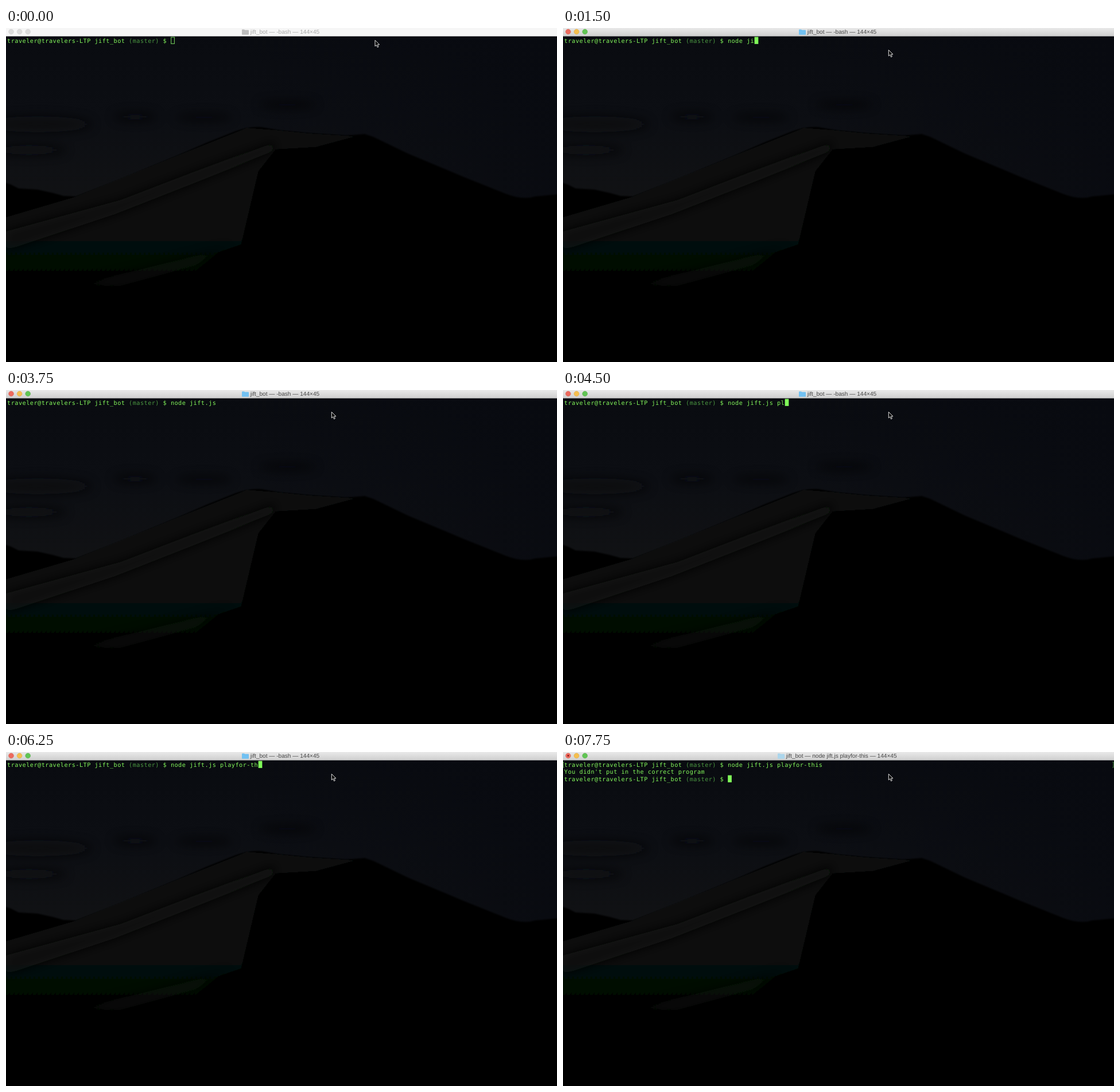
An HTML page for the animation above (8 s loop, 960 by 583 pixels).

```html
<!DOCTYPE html>
<html lang="en">
<head>
<meta charset="utf-8">
<title>Terminal session</title>
<style>
  html, body { margin: 0; width: 100%; height: 100%; overflow: hidden; background: #040506; }
  svg { display: block; width: 100vw; height: 100vh; }
  text { white-space: pre; text-rendering: geometricPrecision; }
  .term text { font: 10.2px "DejaVu Sans Mono", monospace; letter-spacing: .489px; fill: #83f75b; }
  .term .branch { fill: #4c9a42; }
  .term .mark { fill: none; stroke: #4f9446; stroke-width: 1; }
  #title { font: 10.1px "Liberation Sans", Arial, sans-serif; fill: #474747; }
  #folder { fill: #72c1f2; }
  .light { stroke-width: .5; }
  .r { fill: #ed6a5e; stroke: #d5564a; }
  .y { fill: #f5bf4f; stroke: #d8a23c; }
  .g { fill: #61c554; stroke: #4ea73f; }
  .idle #bar { fill: #f6f6f6; }
  .idle #title { fill: #a8a8a8; }
  .idle #folder { fill: #bcbcbc; }
  .idle .light { fill: #dcdcdc; stroke: #cacaca; }
  .busy #folder { fill: #acd6ec; }
  #dot { fill: #7c150f; visibility: hidden; }
  .busy #dot { visibility: visible; }
</style>
</head>
<body>
<svg id="stage" viewBox="0 0 960 583" preserveAspectRatio="none">
  <defs>
    <linearGradient id="sky" x1="0" y1="0" x2="0" y2="1">
      <stop offset="0" stop-color="#090b10"/>
      <stop offset=".5" stop-color="#0c0e13"/>
      <stop offset="1" stop-color="#111214"/>
    </linearGradient>
    <linearGradient id="east" x1="0" y1="0" x2="1" y2="0">
      <stop offset=".4" stop-color="#080a10" stop-opacity="0"/>
      <stop offset="1" stop-color="#080a10" stop-opacity=".9"/>
    </linearGradient>
    <linearGradient id="slope" x1="0" y1="180" x2="0" y2="510" gradientUnits="userSpaceOnUse">
      <stop offset="0" stop-color="#080909"/>
      <stop offset=".55" stop-color="#070807"/>
      <stop offset="1" stop-color="#040506"/>
    </linearGradient>
    <linearGradient id="metal" x1="0" y1="0" x2="0" y2="1">
      <stop offset="0" stop-color="#e9e9e9"/>
      <stop offset="1" stop-color="#cecece"/>
    </linearGradient>
    <filter id="soft" x="-30%" y="-80%" width="160%" height="260%"><feGaussianBlur stdDeviation="9"/></filter>
    <filter id="edge"><feGaussianBlur stdDeviation="1.2"/></filter>
    <clipPath id="hill"><path d="M0 330 L122 294 L300 222 L420 174 L470 178 L630 186 L470 583 H0Z"/></clipPath>
  </defs>

  <rect width="960" height="310" fill="url(#sky)"/>
  <rect width="960" height="310" fill="url(#east)"/>
  <g fill="#07080b" opacity=".65" filter="url(#soft)">
    <ellipse cx="55" cy="168" rx="95" ry="14"/>
    <ellipse cx="225" cy="155" rx="38" ry="7"/>
    <ellipse cx="345" cy="156" rx="50" ry="6"/>
    <ellipse cx="40" cy="213" rx="65" ry="9"/>
    <ellipse cx="490" cy="134" rx="50" ry="6"/>
  </g>
  <path filter="url(#edge)" fill="#040506" d="M-5 269 L8 273 L22 280 L55 282 L82 288 L100 293 L122 294 L200 264 L300 222 L350 200 L400 180 Q425 171 445 173 L480 179 L530 184 L590 188 L625 185 L640 190 L700 219 L800 261 L870 289 Q900 301 922 294 L965 290 V590 H-5Z"/>
  <g clip-path="url(#hill)">
    <path filter="url(#edge)" fill="url(#slope)" d="M0 330 L122 294 L300 222 L420 174 L470 178 L530 184 L610 189 L540 208 L470 212 L440 250 L410 378 L370 392 L330 425 L290 460 L210 490 L150 500 L0 490Z"/>
    <path filter="url(#soft)" fill="#0a0e0a" d="M0 355 L200 300 L330 250 L470 198 L465 216 L330 270 L190 325 L0 388Z"/>
    <path filter="url(#soft)" fill="#080b08" opacity=".7" d="M90 455 L240 420 L390 382 L330 415 L200 450Z"/>
  </g>

  <rect id="bar" width="960" height="14.5" fill="url(#metal)"/>
  <circle class="light r" cx="9" cy="6.5" r="4.4"/>
  <circle class="light y" cx="23.6" cy="6.5" r="4.4"/>
  <circle class="light g" cx="38.2" cy="6.5" r="4.4"/>
  <circle id="dot" cx="9" cy="6.5" r="1.4"/>
  <path id="folder" d="M0 3.2 Q0 2.4 .8 2.4 H4 L5.2 3.6 H11.2 Q12 3.6 12 4.4 V11 Q12 11.8 11.2 11.8 H.8 Q0 11.8 0 11Z"/>
  <text id="title" y="10.3"></text>

  <g class="term">
    <g id="marks" class="mark">
      <path d="M2 17.5 H.5 V27 H2"/>
      <path d="M957.5 17.5 H959 V27 H957.5"/>
    </g>
    <text id="line0" x="2.1" y="25.6"></text>
    <text id="line1" x="2.1" y="38.1"></text>
    <text id="line2" x="2.1" y="50.6"></text>
    <rect id="caret" width="6.7" height="12.3"/>
  </g>

  <path id="mouse" d="M0 0 V10.6 L2.5 8.4 L4.2 12.4 L6 11.6 L4.3 7.7 H7.6Z" fill="#060606" stroke="#e4e4e4" stroke-width="1" stroke-linejoin="round"/>
</svg>
<script>
  const LOOP = 8000, PITCH = 6.63, ROW = 12.5, LEFT = 2.1;
  const GREEN = '#80fa59';
  const APP = 'jift_bot', COMMAND = 'node jift.js playfor-this';
  const HEAD = 'traveler@travelers-LTP ' + APP + ' ', BRANCH = '(master)', TAIL = ' $ ';
  const PROMPT = (HEAD + BRANCH + TAIL).length;
  const REPLY = "You didn't put in the correct program";

  // [time in ms, characters typed so far]
  const TYPED = [
    [0, 0], [750, 2], [1000, 4], [1250, 5], [1500, 7], [1750, 9], [2000, 10],
    [2750, 11], [3000, 12], [3250, 13],
    [4250, 14], [4500, 15], [4750, 16], [5000, 17], [5250, 18],
    [5500, 19], [5750, 21], [6000, 22], [6250, 23], [6500, 25]
  ];
  const ACTIVE = 250, BLINK = [3750, 4250], ENTER = 6750, RUN = 7000, ANSWER = 7500, DONE = 7750;

  const $ = id => document.getElementById(id);
  const place = (el, x, y) => el.setAttribute('transform', `translate(${x} ${y})`);
  const show = (el, on) => el.setAttribute('visibility', on ? 'visible' : 'hidden');

  function addPrompt(line) {
    for (const part of [HEAD, BRANCH, TAIL, '']) {
      const span = document.createElementNS('http://www.w3.org/2000/svg', 'tspan');
      span.textContent = part;
      if (part === BRANCH) span.setAttribute('class', 'branch');
      line.append(span);
    }
    return line.lastChild;
  }

  const input = addPrompt($('line0'));
  addPrompt($('line2'));
  $('line1').textContent = REPLY;

  function drawCaret(t, count) {
    let col = PROMPT + count, row = 0;
    if (t >= DONE) { col = PROMPT; row = 2; }
    else if (t >= ANSWER) { col = 0; row = 2; }
    else if (t >= ENTER) { col = 0; row = 1; }
    const caret = $('caret'), hollow = t < ACTIVE, inset = hollow ? .5 : 0;
    place(caret, LEFT + col * PITCH + inset, 15.6 + row * ROW + inset);
    caret.setAttribute('width', 6.7 - 2 * inset);
    caret.setAttribute('height', 12.3 - 2 * inset);
    caret.setAttribute('fill', hollow ? 'none' : GREEN);
    caret.setAttribute('stroke', hollow ? '#79d85f' : 'none');
    show(caret, t < BLINK[0] || t >= BLINK[1]);
  }

  function draw(t) {
    const idle = t < ACTIVE, busy = t >= RUN;
    const count = TYPED.findLast(step => t >= step[0])[1];
    $('stage').setAttribute('class', idle ? 'idle' : busy ? 'busy' : '');

    $('title').textContent = `${APP} — ${busy ? COMMAND : '-bash'} — 144×45`;
    $('title').setAttribute('x', busy ? 388.8 : 425.8);
    place($('folder'), busy ? 374 : 411, 0);

    input.textContent = COMMAND.slice(0, count);
    show($('marks'), t >= ENTER);
    show($('line1'), t >= ANSWER);
    show($('line2'), t >= DONE);
    drawCaret(t, count);
    place($('mouse'), idle ? 643 : 567.3, idle ? 21.3 : 38.3);
  }

  const start = performance.now();
  function tick() {
    draw((performance.now() - start) % LOOP);
    requestAnimationFrame(tick);
  }
  tick();
</script>
</body>
</html>
```
